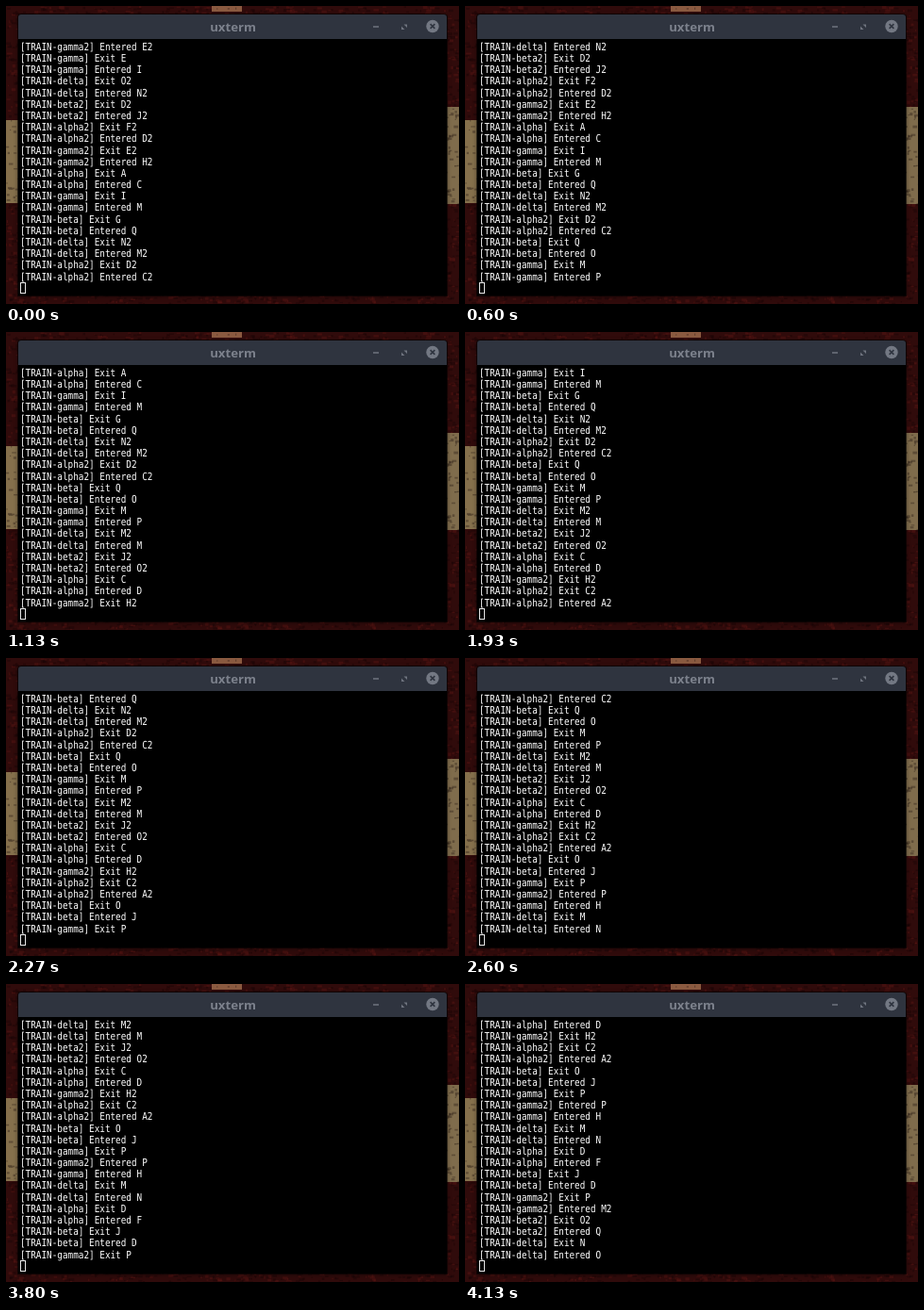
Write an HTML page with a canvas that moves like this. It is 480 px wide and 316 px high and loops after 4.47 s.

```html
<!DOCTYPE html>
<html lang="en">
<head>
<meta charset="utf-8">
<title>uxterm</title>
<style>
html, body { margin: 0; width: 100%; height: 100%; overflow: hidden; background: #2b0a0a; }
#desk, #window, #bar, #terminal, #cursor { position: absolute; }
#desk { left: 0; top: 0; }
#window { left: 13px; top: 9px; width: 454px; height: 298px; background: #000;
  border-radius: 3px 3px 0 0; box-shadow: 0 0 0 1px rgba(0, 0, 0, .6), 0 1px 5px rgba(0, 0, 0, .5);
  overflow: hidden; }
#bar { left: 0; top: 0; width: 454px; height: 26px; background: #2f343f; }
/* Terminal cells are 6 x 13 units, shown at 15/16 size. */
#terminal { margin: 0; left: 1.9px; top: 28.6px; color: #fff;
  font: 9.966px/11px "DejaVu Sans Mono", monospace; white-space: pre;
  text-rendering: geometricPrecision;
  transform: scale(.9375, 1.108); transform-origin: 0 0; }
#cursor { left: 2px; top: 284px; width: 4px; height: 10px; border: 1px solid #e6e6e6; }
</style>
</head>
<body>
<canvas id="desk" width="480" height="316"></canvas>
<div id="window">
  <svg id="bar" viewBox="13 9 454 26" stroke-width="1.6">
    <text x="240.500" y="27" text-anchor="middle" fill="#7c818c"
      font-family="Noto Sans, sans-serif" font-size="13.2" font-weight="700">uxterm</text>
    <path d="M389 22H395" stroke="#6f747f"/>
    <path d="M421.5 19.5H425V23ZM419 21.5V25H422.5Z" fill="#6f747f"/>
    <circle cx="452" cy="21.5" r="6.7" fill="#737883"/>
    <path d="M449.6 19.1L454.4 23.9M454.4 19.1L449.6 23.9" stroke="#2f343f"/>
  </svg>
  <pre id="terminal"></pre>
  <div id="cursor"></div>
</div>
<script>
const LOOP = 4470, ROWS = 21, FPS = 15;

// "+" is an arrival in a block, "-" a departure from it.
const log = `gamma2+E2 gamma-E gamma+I delta-O2 delta+N2 beta2-D2 beta2+J2 alpha2-F2 alpha2+D2
  gamma2-E2 gamma2+H2 alpha-A alpha+C gamma-I gamma+M beta-G beta+Q delta-N2 delta+M2
  alpha2-D2 alpha2+C2 beta-Q beta+O gamma-M gamma+P delta-M2 delta+M beta2-J2 beta2+O2
  alpha-C alpha+D gamma2-H2 alpha2-C2 alpha2+A2 beta-O beta+J gamma-P gamma2+P gamma+H
  delta-M delta+N alpha-D alpha+F beta-J beta+D gamma2-P gamma2+M2 beta2-O2 beta2+Q
  delta-N delta+O`.split(/\s+/).map(entry => {
    const [, train, sign, block] = entry.match(/(\w+)([+-])(\w+)/);
    return `[TRAIN-${train}] ${sign === "+" ? "Entered" : "Exit"} ${block}`;
  });

// Bursts of output: first tick and number of lines, one line per tick.
const bursts = [[6, 4], [11, 7], [21, 2], [30, 2], [34, 3], [38, 2], [51, 1], [51, 1], [55, 8]];

function scrolledLines(t) {
  const tick = Math.floor((t + 4) * FPS / 1000);
  return bursts.reduce((sum, [first, lines]) =>
    sum + Math.min(lines, Math.max(0, tick - first + 1)), 0);
}

function paintDesk() {
  const ctx = document.getElementById("desk").getContext("2d");
  let seed = 7;
  const random = () => (seed = seed * 16807 % 2147483647) / 2147483647;
  const rect = (color, ...box) => {
    ctx.fillStyle = color;
    ctx.fillRect(...box);
  };
  const speckle = (count, color, size) => {
    for (let i = 0; i < count; i++) {
      rect(color, random() * 480, random() * 316, 1 + random() * size, 1 + random() * size / 2);
    }
  };
  rect("#300b0b", 0, 0, 480, 316);
  speckle(2500, "rgba(110,28,24,.3)", 5);
  rect("#85704c", 0, 121, 14, 88);
  rect("#7f6c4c", 466, 107, 14, 103);
  rect("#8a5a40", 218, 0, 32, 6);
  speckle(3500, "rgba(14,3,4,.3)", 4);
}

const terminal = document.getElementById("terminal");
let shownTop = -1;

function draw(t) {
  const top = scrolledLines(t);
  if (top === shownTop) return;
  terminal.textContent = log.slice(top, top + ROWS).join("\n");
  shownTop = top;
}

paintDesk();
const start = performance.now();
function animate() {
  draw((performance.now() - start) % LOOP);
  requestAnimationFrame(animate);
}
animate();
</script>
</body>
</html>
```
